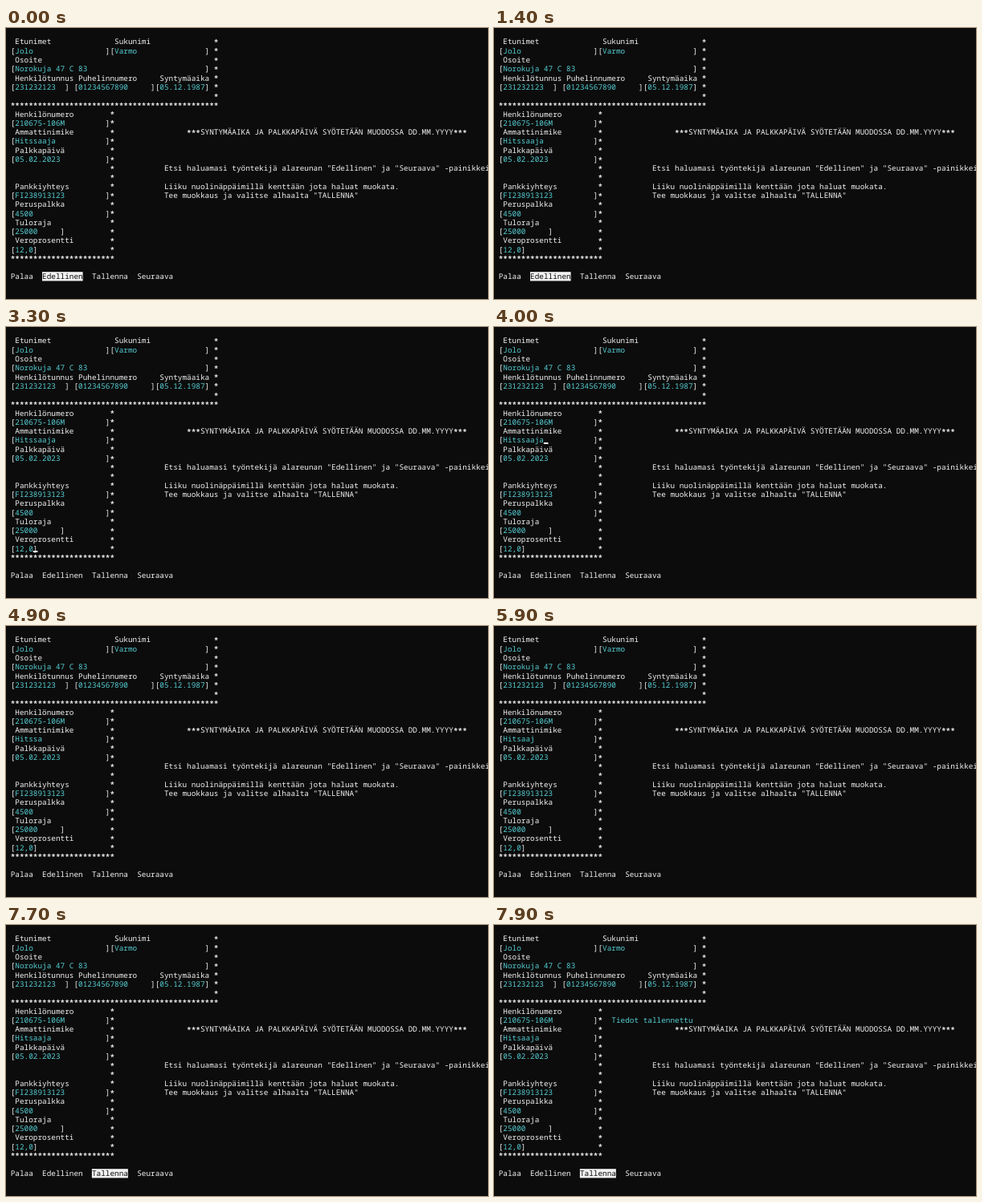
Write an HTML page with a canvas that moves like this. It is 600 px wide and 338 px high and loops after 8000 ms.

```html
<!DOCTYPE html>
<html lang="fi">
<head>
<meta charset="utf-8">
<title>Työntekijän tiedot</title>
<style>
  html, body { margin: 0; width: 100%; height: 100%; overflow: hidden; background: #0c0c0c; }
  canvas { display: block; }
</style>
</head>
<body>
<canvas id="screen" width="600" height="338"></canvas>
<script>
const ctx = document.getElementById('screen').getContext('2d');
const CELL_W = 5.625, CELL_H = 338 / 30, BASELINE = 9.2, LOOP = 8000;
const BG = '#0c0c0c', WHITE = '#f2f2f2', CYAN = '#55cdd2';
const FONT = '9.375px "Noto Sans Mono", "DejaVu Sans Mono", monospace';

// [row, column, text]
const LABELS = [
  [1, 2, 'Etunimet'], [1, 24, 'Sukunimi'],
  [3, 2, 'Osoite'],
  [5, 2, 'Henkilötunnus'], [5, 16, 'Puhelinnumero'], [5, 34, 'Syntymäaika'],
  [8, 1, '*'.repeat(46)],
  [9, 2, 'Henkilönumero'], [11, 2, 'Ammattinimike'], [13, 2, 'Palkkapäivä'],
  [17, 2, 'Pankkiyhteys'], [19, 2, 'Peruspalkka'], [21, 2, 'Tuloraja'], [23, 2, 'Veroprosentti'],
  [25, 1, '*'.repeat(23)],
  [11, 40, '***SYNTYMÄAIKA JA PALKKAPÄIVÄ SYÖTETÄÄN MUODOSSA DD.MM.YYYY***'],
  [15, 35, 'Etsi haluamasi työntekijä alareunan "Edellinen" ja "Seuraava" -painikkeilla'],
  [17, 35, 'Liiku nuolinäppäimillä kenttään jota haluat muokata.'],
  [18, 35, 'Tee muokkaus ja valitse alhaalta "TALLENNA"']
];

// [row, column of the opening bracket, width, value]
const FIELDS = [
  [2, 1, 20, 'Jolo'], [2, 23, 20, 'Varmo'],
  [4, 1, 42, 'Norokuja 47 C 83'],
  [6, 1, 11, '231232123'], [6, 15, 16, '01234567890'], [6, 33, 10, '05.12.1987'],
  [10, 1, 20, '210675-106M'], [14, 1, 20, '05.02.2023'],
  [18, 1, 20, 'FI238913123'], [20, 1, 20, '4500'], [22, 1, 10, '25000'], [24, 1, 4, '12,0']
];

const BUTTONS = [[1, 'Palaa'], [8, 'Edellinen'], [19, 'Tallenna'], [29, 'Seuraava']];

// Each track lists [start time, value]
const TITLE = [
  [0, 'Hitssaaja'], [4500, 'Hitssaaj'], [4800, 'Hitssaa'], [4900, 'Hitssa'], [5100, 'Hitss'],
  [5400, 'Hits'], [5600, 'Hitsa'], [5700, 'Hitsaa'], [5900, 'Hitsaaj'], [6000, 'Hitsaaja']
];
const SELECTED = [[0, 1], [3200, -1], [7200, 1], [7400, 2]];
const CURSOR = [
  [0, null], [3200, [24, 6]], [3500, [22, 7]], [3700, [20, 6]], [3800, [18, 13]],
  [3900, [14, 12]], [4000, [12, 11]], [4100, [10, 13]], [4300, [12, 11]], [4500, null],
  [6300, [14, 12]], [6600, [18, 13]], [6700, [20, 6]], [6900, [22, 7]], [7000, [24, 6]], [7200, null]
];
const SAVED_AT = 7800;

function valueAt(track, t) {
  let value;
  for (const [start, v] of track) if (t >= start) value = v;
  return value;
}

function print(row, col, text, color = WHITE) {
  ctx.fillStyle = color;
  [...text].forEach((ch, i) => {
    if (ch === ' ') return;
    const star = ch === '*';
    ctx.font = (star ? 'bold ' : '') + FONT;
    ctx.fillText(ch, (col + i) * CELL_W, row * CELL_H + BASELINE + (star ? 0.6 : 0));
  });
}

function field(row, col, width, value) {
  print(row, col, '[');
  print(row, col + 1, value, CYAN);
  print(row, col + 1 + width, ']');
}

function draw(t) {
  ctx.fillStyle = BG;
  ctx.fillRect(0, 0, 600, 338);
  ctx.textRendering = 'geometricPrecision';

  for (const label of LABELS) print(...label);
  for (let row = 1; row < 8; row++) print(row, 46, '*');
  for (let row = 9; row < 25; row++) print(row, 23, '*');
  for (const f of FIELDS) field(...f);
  field(12, 1, 20, valueAt(TITLE, t));

  const selected = valueAt(SELECTED, t);
  BUTTONS.forEach(([col, text], i) => {
    if (i === selected) {
      ctx.fillStyle = WHITE;
      ctx.fillRect(col * CELL_W, 27 * CELL_H, text.length * CELL_W, CELL_H);
    }
    print(27, col, text, i === selected ? BG : WHITE);
  });

  const cursor = valueAt(CURSOR, t);
  if (cursor) {
    ctx.fillStyle = WHITE;
    ctx.fillRect(cursor[1] * CELL_W, Math.round(cursor[0] * CELL_H + 9), CELL_W, 2);
  }
  if (t >= SAVED_AT) print(10, 26, 'Tiedot tallennettu', CYAN);
}

const begin = performance.now();
function tick() {
  draw((performance.now() - begin) % LOOP);
  requestAnimationFrame(tick);
}
tick();
</script>
</body>
</html>
```
